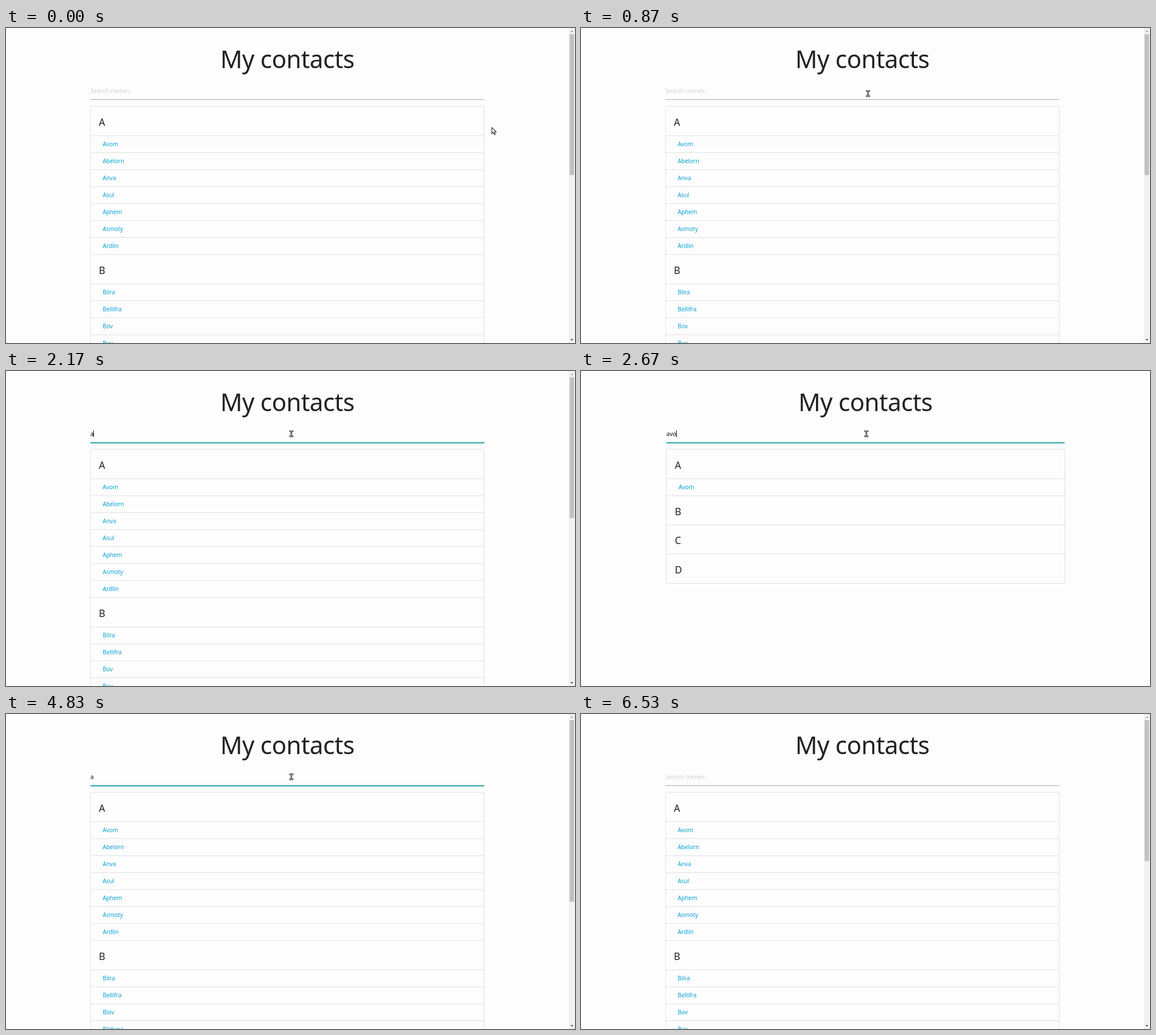
Recreate the animation shown at these times as an HTML page. Size 1005 by 557 pixels, loop 7160 ms.

```html
<!DOCTYPE html>
<html lang="en">
<head>
<meta charset="utf-8">
<title>My contacts</title>
<style>
  html, body { margin: 0; width: 100%; height: 100%; overflow: hidden; background: #fdfdfd; }
  svg { display: block; width: 100%; height: 100%; }
  text { font-family: "Noto Sans", "Open Sans", sans-serif; fill: #222; }
  .title { font-size: 43px; letter-spacing: -.01em; text-anchor: middle; }
  .head { font-size: 17.3px; }
  .name { font-size: 10.2px; font-weight: 500; fill: #06a0d4; }
  .field { font-size: 10.5px; fill: #111; }
  .hint { fill: #d0d0d0; }
  .rule { fill: #e0e0e3; }
  .box { fill: none; stroke: #e0e0e3; }

  .line, .glow, .cursor, .arrow, .beam { animation: 7160ms linear infinite; }
  .line { animation-name: line; }
  .glow { fill: #2aa3a6; animation-name: glow; }
  .cursor { animation-name: move; }
  .arrow { animation-name: arrow; animation-timing-function: step-end; }
  .beam { animation-name: beam; animation-timing-function: step-end; }

  @keyframes line {
    0%, 20.67%, 88.7%, 100% { fill: #a6a6ae; }
    24.86%, 84.5% { fill: #2aa3a6; }
  }
  @keyframes glow {
    0%, 20.67%, 88.7%, 100% { opacity: 0; }
    24.86%, 84.5% { opacity: 1; }
  }
  @keyframes move {
    0%, .42% { transform: translate(858px, 176px); animation-timing-function: ease-in-out; }
    10.2% { transform: translate(510px, 117px); }
    12.15% { transform: translate(507px, 116px); }
    15.4% { transform: translate(504px, 111px); }
    70.95% { transform: translate(504px, 111px); animation-timing-function: ease-in; }
    80.03% { transform: translate(767px, 140px); animation-timing-function: ease-out; }
    84.5% { transform: translate(868px, 185px); animation-timing-function: ease-in; }
    90.8%, 100% { transform: translate(984px, 562px); }
  }
  @keyframes arrow {
    0% { opacity: 1; }
    7.3% { opacity: 0; }
    77.2%, 100% { opacity: 1; }
  }
  @keyframes beam {
    0% { opacity: 0; }
    7.3% { opacity: 1; }
    77.2%, 100% { opacity: 0; }
  }
</style>
</head>
<body>
<svg viewBox="0 0 1005 557">
  <rect width="1005" height="557" fill="#fdfdfd"/>
  <text class="title" id="title" y="70.5">My contacts</text>

  <text class="field" id="field" y="115"></text>
  <rect id="spell" y="116" height="1" fill="#e0606a"/>
  <rect id="caret" y="105" width="1" height="12" fill="#111"/>
  <rect class="line span" y="126" height="1"/>
  <rect class="glow span" y="127" height="1"/>

  <g id="list"></g>

  <g id="bar">
    <rect x="994" width="11" height="557" fill="#f1f1f1"/>
    <rect id="thumb" x="995.5" y="11" width="8" fill="#c1c1c1"/>
    <path d="M997 7l2.5-3 2.5 3z" fill="#a3a3a3"/>
    <path d="M997 550l2.5 3 2.5-3z" fill="#505050"/>
  </g>

  <g class="cursor">
    <path class="arrow" d="M0 0v10.8l2.5-2.3 2 4.2 1.9-.9-2-4.1h3.4z" fill="#fff" stroke="#222" stroke-width="1.1"/>
    <g class="beam" fill="none">
      <path d="M-3.5-4.5h7M-3.5 4.5h7M0-4.5v9" stroke="#222" stroke-width="2.6"/>
      <path d="M-2.5-4.5h5M-2.5 4.5h5M0-4.5v9" stroke="#ddd" stroke-width=".8"/>
    </g>
  </g>
</svg>
<script>
const LOOP = 7160, STAGE = 1005, BAR = 11;
const TOP = 138.5, HEAD = 51.8, ROW = 30;
const groups = {
  A: ['Avom', 'Abelorn', 'Anva', 'Asul', 'Aphem', 'Asmoty', 'Ardlin'],
  B: ['Bilra', 'Bellifra', 'Bov', 'Buv', 'Blav', 'Bilduna'],
  C: [],
  D: []
};

// start ms, typed text, applied filter, focused caret, spelling mark
const steps = [
  [0, '', '', 0],
  [1480, '', '', 1],
  [2170, 'a', '', 1],
  [2330, 'a', 'a', 1],
  [2430, 'av', 'a', 1],
  [2530, 'av', 'av', 1],
  [2570, 'avo', 'av', 1],
  [2640, 'avo', 'avo', 1],
  [2700, 'avom', 'avo', 1],
  [2770, 'avom', 'avom', 1],
  [3300, 'avom', 'avom', 0],
  [3730, 'avom', 'avom', 0, 1],
  [3900, 'avom', 'avom', 1, 1],
  [4370, 'avo', 'avom', 1],
  [4450, 'avo', 'avo', 1],
  [4500, 'av', 'avo', 1],
  [4580, 'av', 'av', 1],
  [4650, 'a', 'av', 1],
  [4760, 'a', 'a', 0],
  [4970, '', 'a', 1],
  [5050, '', '', 1],
  [6050, '', '', 0]
];

const $ = id => document.getElementById(id);
const set = (el, attrs) => { for (const k in attrs) el.setAttribute(k, attrs[k]); };
const show = (el, on) => { el.style.display = on ? '' : 'none'; };
const label = (cls, x, y, s) => `<text class="${cls}" x="${x}" y="${y}">${s}</text>`;

function drawList(left, width, query) {
  let y = TOP, out = '';
  const advance = h => {
    y += h;
    out += `<rect class="rule" x="${left}" y="${Math.floor(y)}" width="${width}" height="1"/>`;
  };
  for (const letter in groups) {
    out += label('head', left + 14.9, y + 34.2, letter);
    advance(HEAD);
    for (const name of groups[letter]) {
      if (!name.toLowerCase().includes(query)) continue;
      out += label('name', left + 21.7, y + 18.6, name);
      advance(ROW);
    }
  }
  const x = Math.floor(left) + .5, right = Math.floor(left + width) + .5;
  out += `<rect class="box" x="${x}" y="${TOP}" width="${right - x}" height="${Math.floor(y) + .5 - TOP}" rx="1.5"/>`;
  $('list').innerHTML = out;
}

function draw([, typed, query, caret, marked]) {
  const scrolls = query.length < 2;
  const page = scrolls ? STAGE - BAR : STAGE;
  const left = page * .15, width = page * .7;

  set($('title'), { x: page / 2 });
  const field = $('field');
  field.textContent = typed || 'Search names..';
  set(field, { x: left, class: typed ? 'field' : 'field hint' });
  const end = typed ? field.getComputedTextLength() : 0;
  set($('caret'), { x: Math.floor(left + end) });
  set($('spell'), { x: left, width: end });
  show($('caret'), caret);
  show($('spell'), marked);
  document.querySelectorAll('.span').forEach(el => set(el, { x: left, width }));

  drawList(left, width, query);
  show($('bar'), scrolls);
  set($('thumb'), { height: query ? 321 : 249 });
}

let start, current;
function tick(now) {
  start ??= now;
  const t = (now - start) % LOOP;
  const step = steps.findLast(s => s[0] <= t) || steps[0];
  if (step !== current) draw(current = step);
  requestAnimationFrame(tick);
}
draw(current = steps[0]);
requestAnimationFrame(tick);
</script>
</body>
</html>
```
